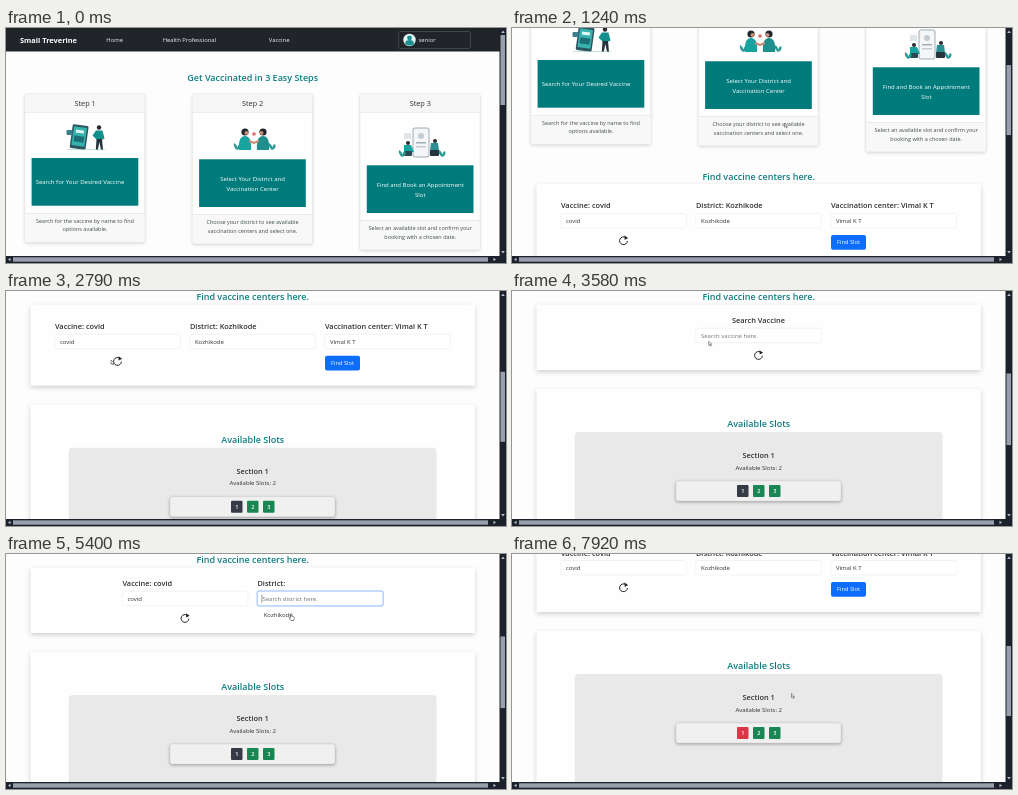
Recreate the animation shown at these times as an HTML page. Size 500 by 235 pixels, loop 8 s.

```html
<!DOCTYPE html>
<html lang="en">
<head>
<meta charset="utf-8">
<title>Vaccine booking</title>
<style>
  html, body { margin: 0; width: 100%; height: 100%; overflow: hidden; background: #fdfdfd; }
  svg { display: block; width: 100vw; height: 100vh; font-family: 'Open Sans', 'Noto Sans', sans-serif; }
  .card { fill: #fefefe; filter: drop-shadow(0 2px 2.5px rgba(0, 0, 0, .18)); }
  .step { fill: #fefefe; stroke: #dcdcdc; stroke-width: .5; filter: drop-shadow(0 1px 1.5px rgba(0, 0, 0, .15)); }
</style>
</head>
<body>
<svg viewBox="0 0 500 235" preserveAspectRatio="none">
  <g id="page">
    <g id="top"></g>
    <g id="form"></g>
    <g id="slots"></g>
  </g>
  <g id="bars"></g>
  <g id="cursor"></g>
</svg>
<script>
const LOOP = 8000, TEAL = '#007b7c', HEAD = '#0c7c81', INK = '#2b3035';
const $ = id => document.getElementById(id);

// Text whose visual middle sits at y.
const text = (x, y, str, size, { fill = INK, weight = 400, anchor = 'start' } = {}) =>
  `<text x="${x}" y="${y + size * .34}" font-size="${size}" fill="${fill}" font-weight="${weight}" text-anchor="${anchor}">${str}</text>`;
const mid = (x, y, str, size, opts) => text(x, y, str, size, { ...opts, anchor: 'middle' });
const rect = (x, y, w, h, fill, attrs = '') =>
  `<rect x="${x}" y="${y}" width="${w}" height="${h}" fill="${fill}" ${attrs}/>`;
const path = (d, fill, attrs = '') => `<path d="${d}" fill="${fill}" ${attrs}/>`;
const circle = (x, y, r, fill) => `<circle cx="${x}" cy="${y}" r="${r}" fill="${fill}"/>`;
const title = (y, str) => mid(246.7, y, str, 9, { fill: HEAD, weight: 600 });

const leaf = (x, y) => path(`M${x} ${y}q-4-3-3-7q4 2 3 7q0-5 3-6q2 4-3 6`, '#2b9a96');
// Upper body with a round head of hair, a face and a shirt.
const bust = (x, y, face, shirt) => circle(x, y, 3.6, '#20272e') + circle(x + face, y + 1, 2, '#c98a72') +
  path(`M${x - 6} ${y + 18}q-1-14 6-14q7 0 6 14z`, shirt);

const art = [
  `<g transform="rotate(8 73 110)">` + rect(65, 97, 16, 24, '#2d5560', 'rx="1.5"') + rect(66.5, 99, 13, 19, '#36b3ae') +
    rect(69, 102, 8, 3, '#e6f6f5') + rect(68, 108, 10, 6, '#1c6f75') + '</g>' + rect(60.5, 102, 6, 5, '#3b7f8a', 'rx="1"') +
    circle(93, 99.5, 2.2, '#2b2a30') + path('M90 102.500h6.500l2 8l-2 1h-6l-4-4z', '#138f8d') +
    path('M90.500 111h5.500l1 11h-2l-1.600-8l-1.600 8h-2z', '#24323d') + rect(61, 121.5, 38, .6, '#9ccfcd'),
  bust(239, 104, 1.5, '#17a49f') + bust(257, 104, -1.5, '#1f8f8e') +
    path('M243 113l5 2l5-2', 'none', 'stroke="#c98a72" stroke-width="2"') +
    circle(248, 106, 1.8, '#d96a66') + leaf(231, 122) + leaf(266, 122),
  rect(407, 100, 16, 29, '#f4f6f8', 'rx="2" stroke="#8b979f" stroke-width=".8"') + circle(415, 108, 3, '#c3ccd3') +
    rect(410, 114, 10, 1.5, '#9fb0b8') + rect(410, 118, 10, 1.5, '#c3ccd3') + rect(398, 105, 7, 6, '#dfe6ea') +
    circle(402, 115, 2, '#2b2a30') + path('M398 117h7l3 7h-10z', '#17a49f') + rect(398, 123, 8, 5, '#2d4855', 'rx="1"') +
    circle(429, 113, 2, '#2b2a30') + path('M425 115h7l1 8h-9z', '#2c8d92') + rect(424, 122, 9, 6, '#25333d', 'rx="1"') +
    leaf(396, 129) + leaf(436, 129),
];

const steps = [
  { x: 18.8, dy: 0, button: ['Search for Your Desired Vaccine'], note: ['Search for the vaccine by name to find', 'options available.'] },
  { x: 186.3, dy: 1.3, button: ['Select Your District and', 'Vaccination Center'], note: ['Choose your district to see available', 'vaccination centers and select one.'] },
  { x: 354, dy: 7.3, button: ['Find and Book an Appointment', 'Slot'], note: ['Select an available slot and confirm your', 'booking with a chosen date.'] },
];

function stepCard({ x, dy, button, note }, i) {
  const cx = x + 60, lines = button.length;
  return rect(x, 66, 120, 148.5 + dy, '#fff', 'rx="2" class="step"') +
    rect(x + .3, 66.3, 119.4, 17.7, '#f6f6f6') + rect(x, 84, 120, .5, '#ddd') +
    mid(cx + .3, 75.3, 'Step ' + (i + 1), 7.3, { weight: 500 }) + art[i] +
    rect(x + 6.8, 130 + dy, 106.7, 47.7, TEAL) +
    button.map((s, n) => lines > 1
      ? mid(cx + .3, 150 + dy + n * 9.3, s, 6, { fill: '#fff' })
      : text(29.7, 154.3, s, 6, { fill: '#fff' })).join('') +
    rect(x + .3, 185 + dy, 119.4, 29, '#f8f8f8') + rect(x, 185 + dy, 120, .5, '#ddd') +
    note.map((s, n) => mid(cx + .2, 192.7 + dy + n * 8.9, s, 5.5, { fill: '#3f4c50' })).join('');
}

const navText = (x, str) => text(x, 12, str, 5.9, { fill: '#f0f0f0' });
$('top').innerHTML =
  rect(0, 0, 494, 23.5, '#212529') +
  text(14, 12, 'Small Treverine', 7.4, { fill: '#fff', weight: 700 }) +
  navText(100.3, 'Home') + navText(156.7, 'Health Professional') + navText(262.8, 'Vaccine') +
  rect(392.5, 3.5, 72, 17, 'none', 'rx="2" stroke="#555b61" stroke-width=".6"') +
  circle(403.5, 12, 6.2, '#e8f7f6') + circle(403.5, 10, 2.4, '#1c8f92') + path('M399 16q0-4 4.500-4t4.500 4q-4 3.500-9 0', '#1c8f92') +
  text(412.5, 11.5, 'senior', 5.9, { fill: '#f0f0f0' }) +
  title(49.7, 'Get Vaccinated in 3 Easy Steps') + steps.map(stepCard).join('') +
  title(246.7, 'Find vaccine centers here.');

const slotButton = (i, fill) => rect(225 + i * 16, 450, 11.5, 12, fill, `rx="1" ${i ? '' : 'id="first"'}`) +
  mid(230.8 + i * 16, 456, i + 1, 5.6, { fill: '#fff', weight: 600 });
$('slots').innerHTML =
  rect(24.5, 354, 444.3, 340, '#fff', 'class="card"') + title(389.3, 'Available Slots') +
  rect(62.7, 397, 367.8, 280, '#e9e9e9', 'rx="4"') +
  mid(246.7, 420.7, 'Section 1', 7.4, { weight: 600 }) + mid(246.7, 432.7, 'Available Slots: 2', 6) +
  rect(164, 446, 165, 20, '#f0f0f0', 'rx="2.5" stroke="#d2d2d2" stroke-width=".5" style="filter:drop-shadow(0 1px 1.5px #0005)"') +
  slotButton(0, '#343a46') + slotButton(1, '#198754') + slotButton(2, '#198754');

const fields = [
  { label: 'Vaccine', value: 'covid', hint: 'Search vaccine here.', options: ['Covid', 'Nipa vaccine', 'Sdf', 'Orbel tanvo', 'Abc'] },
  { label: 'District', value: 'Kozhikode', hint: 'Search district here.', options: ['Kozhikode'] },
  { label: 'Vaccination center', value: 'Vimal K T', hint: 'Search vaccination center here.', options: ['Vimal K T'] },
];

// chosen: filled fields; open: 1 shows the options, 2 also marks the first. Returns the card's bottom.
function drawForm(chosen, open) {
  const columns = Math.min(chosen + 1, 3), left = 251.4 - columns * 67.5;
  const shift = chosen === 3 ? 6 : 0;
  const listHeight = open ? fields[chosen].options.length * 15.2 : 0;
  const bold = { weight: 600 };
  let out = '';
  for (let i = 0; i < columns; i++) {
    const { label, value, hint, options } = fields[i];
    const x = left + i * 135, done = i < chosen, y = 270 + shift, focus = !done && open;
    out += chosen ? text(x, y, done ? `${label}: ${value}` : label + ':', 7.4, bold) : mid(x + 62.5, y, 'Search Vaccine', 7.4, bold);
    if (focus) out += rect(x - 1, y + 6.5, 127.5, 16.5, '#c5dbfc', 'rx="2.5"');
    out += rect(x, y + 7.5, 125.5, 14.5, '#fff', `rx="2" stroke="${focus ? '#86b7fe' : '#e9ebed'}" stroke-width=".6"`) +
      text(x + 5, y + 14.8, done ? value : hint, 6, { fill: done ? INK : '#6c757d' });
    if (focus) {
      out += rect(x + 4.3, y + 11, .5, 8, '#333');
      options.forEach((s, n) => {
        const hot = open === 2 && !n, oy = y + 31.5 + n * 15.2;
        if (hot) out += rect(x, oy - 6.3, 125.5, 12.6, '#ebebdd');
        out += text(x + 6.3, oy, s, 6, { weight: hot ? 600 : 400 });
      });
    }
  }
  const iconY = 304.7 + shift + (chosen ? 0 : listHeight);
  out += `<g transform="translate(${left + 62.6} ${iconY})">` +
    path('M2.3-3.1A3.9 3.9 0 1 0 3.9 .3', 'none', 'stroke="#222" stroke-width="1"') + path('M1-5.2L4.6-2.7L1.2-.8z', '#222') + '</g>';
  if (columns === 3) {
    const y = 306.3 + shift + listHeight;
    out += rect(left + 270.1, y - 7.3, 35, 14.8, '#0d6efd', 'rx="2"') + mid(left + 287.6, y, 'Find Slot', 5.7, { fill: '#fff' });
  }
  const bottom = columns === 3 ? 323 + shift * 2 + listHeight : 319.3 + (chosen ? 0 : listHeight);
  $('form').innerHTML = rect(24.5, 254, 444.3, bottom - 254, '#fff', 'class="card"') + out;
  return bottom;
}

const BAR = '#1c222c', THUMB = '#98a0ae';
$('bars').innerHTML =
  rect(493.5, 0, 6.5, 235, BAR) + rect(0, 228, 500, 7, BAR) +
  rect(7, 229.3, 475, 4.4, THUMB) + rect(494.5, 7, 4.5, 70, THUMB, 'id="thumb"') +
  path('M497 2.5l1.8 2.5h-3.6zM497 225.5l1.8-2.5h-3.6zM2 231.5l2.5-1.8v3.6zM490 231.5l-2.5-1.8v3.6z', '#b9bec8');
$('cursor').innerHTML =
  path('M0 0V4.2L1 3.3L1.8 4.9L2.5 4.6L1.8 3H3z', '#fff', 'id="arrow" stroke="#333" stroke-width=".5"') +
  path('M-.5 0q.7-.8 1.3 0v2.3l2 .5q.7 .3 .5 1.4l-.6 2.3h-2.8l-1.8-2.6q.4-.8 1.4 0z', '#fff', 'id="hand" stroke="#222" stroke-width=".5"');

// Keys of [time, ...values], linear between neighbours.
function sample(keys, t) {
  const i = keys.findIndex(k => k[0] > t);
  if (i === 0) return keys[0].slice(1);
  if (i < 0) return keys[keys.length - 1].slice(1);
  const a = keys[i - 1], b = keys[i], p = (t - a[0]) / (b[0] - a[0]);
  return a.slice(1).map((v, n) => v + (b[n + 1] - v) * p);
}
const scrollKeys = [[790, 0], [1020, 27.2], [1450, 165], [1580, 183], [1960, 183], [2420, 240.3], [7200, 240.3], [7900, 277]];
const cursorKeys = [
  [1960, 272.6, 95], [2420, 102, 71], [2760, 102, 71], [2790, 105, 69], [2900, 110, 69], [3130, 110, 69],
  [3290, 150, 58], [3460, 150, 58], [3680, 235, 44], [3840, 235, 44], [4370, 209, 64], [4670, 209, 64],
  [5100, 310, 44], [5250, 310, 44], [5400, 285, 60], [5560, 285, 60], [6000, 370, 44], [6080, 370, 44],
  [6290, 349.5, 56], [6600, 349.5, 56], [6850, 338, 70], [7200, 338, 70], [7900, 279.5, 139.5],
];
const states = [[0, 3, 0], [3200, 0, 0], [3840, 0, 1], [4250, 0, 2], [4640, 1, 0], [5200, 1, 1], [5560, 2, 0], [6050, 2, 1], [6600, 3, 0]];
const handTimes = [[2880, 3200], [4250, 4700], [5350, 5600], [6250, 6640], [6800, 7250]];
const show = (id, on) => $(id).setAttribute('display', on ? 'inline' : 'none');

let current, bottom;
function frame(now) {
  const t = now % LOOP;
  const state = states.findLast(s => s[0] <= t);
  if (state !== current) {
    current = state;
    bottom = drawForm(state[1], state[2]);
    $('slots').setAttribute('transform', `translate(0 ${bottom - 335})`);
  }
  const [scroll] = sample(scrollKeys, t), [x, y] = sample(cursorKeys, t);
  $('page').setAttribute('transform', `translate(0 ${-scroll})`);
  $('cursor').setAttribute('transform', `translate(${x} ${y})`);
  const hand = handTimes.some(([a, b]) => t >= a && t < b);
  show('cursor', t >= 790);
  show('hand', hand);
  show('arrow', !hand);
  $('first').setAttribute('fill', t > 7100 ? '#dc3545' : '#343a46');
  const ratio = 214 / (697 + bottom - 335);
  $('thumb').setAttribute('y', 7 + scroll * ratio);
  $('thumb').setAttribute('height', 228 * ratio);
  requestAnimationFrame(frame);
}
frame(performance.now());
</script>
</body>
</html>
```
